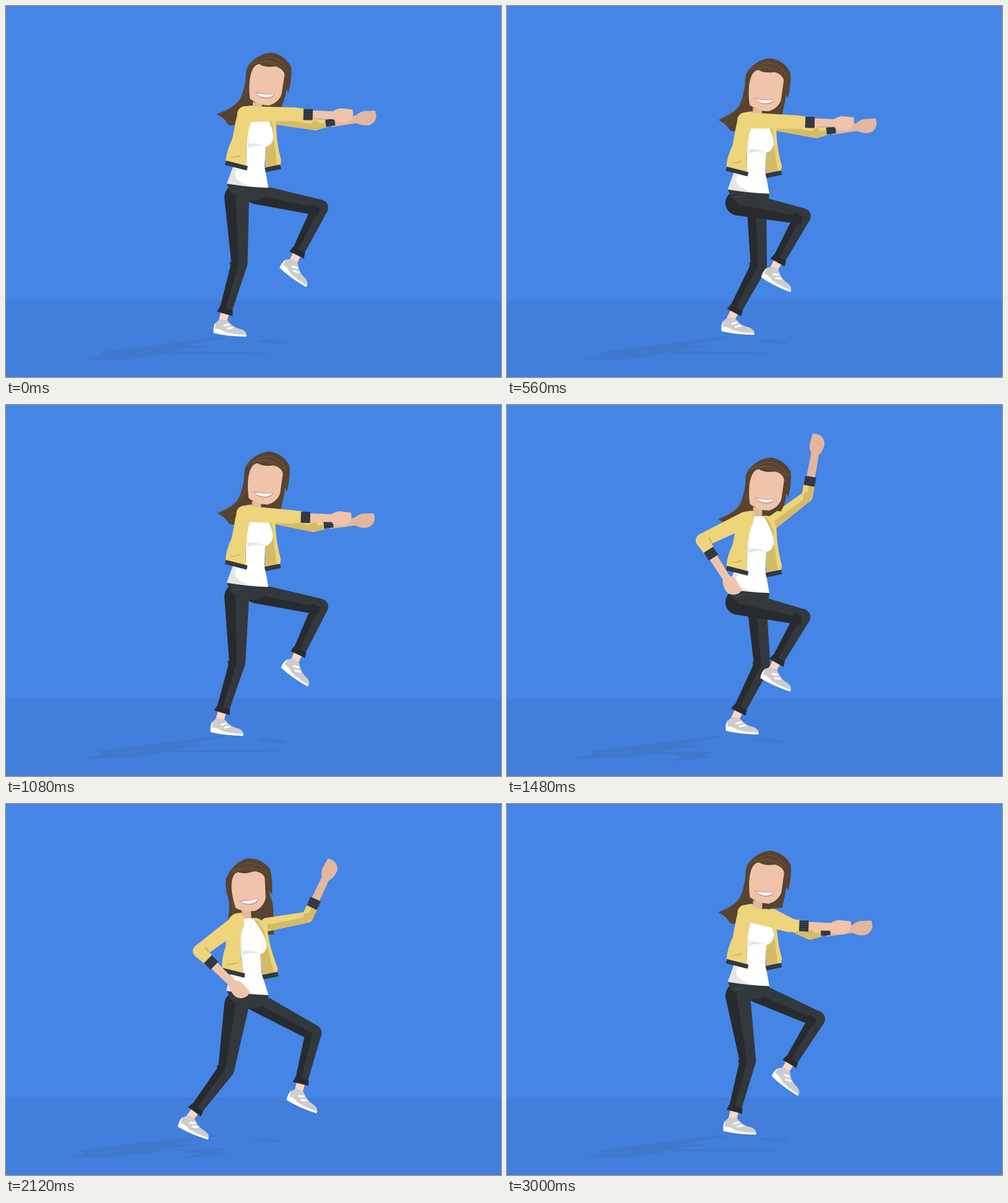
Write an HTML page with a canvas that moves like this. It is 800 by 600 pixels and loops after 3040 ms.

```html
<!DOCTYPE html>
<html>
<head>
<meta charset="utf-8">
<style>
html, body { margin: 0; width: 100%; height: 100%; overflow: hidden; background: #4585e5; }
canvas { display: block; }
</style>
</head>
<body>
<canvas id="stage" width="800" height="600"></canvas>
<script>
const ctx = document.getElementById('stage').getContext('2d');
const LOOP = 3040, STEP = 40;
const BEATS = [0, 580, 1069, 1520, 1970, 2590, LOOP];
const PANTS = '#33383c', PANTS_DARK = '#272b2f', NAVY = '#2a303b';
const YELLOW = '#eed47a', MUSTARD = '#d4bb68', HAIR = '#574330';
const SKIN = '#efc4aa', SKIN_DARK = '#e2b79e', ANKLE = '#ffd5c5';

// Periodic keys: [phase, values...], phase in 0..1
const FOOT_NEAR = [
  [0, 350, 510, 4], [.121, 297, 508, 21], [.25, 257, 500, 38], [.35, 338, 458, 40],
  [.456, 429, 428, 22], [.483, 431, 426, 25], [.555, 443, 453, 17],
  [.75, 446, 511, 3], [.956, 364, 510, 4]];
const FOOT_FAR = [
  [0, 464, 414, 34], [.121, 473, 465, 22], [.25, 465, 511, 3], [.456, 368, 508, 4],
  [.483, 361, 507, 4], [.555, 338, 505, 13], [.75, 295, 500, 35],
  [.86, 372, 458, 42], [.956, 450, 431, 35]];
const DROP = [[0, 0], [.121, 15], [.25, 27], [.36, 20], [.456, 10], [.5, 9.5],
  [.555, 15], [.75, 25], [.88, 9], [.956, .5]];
const LEAN = [[0, .03], [.11, .83], [.242, 1], [.5, .85], [.75, .35], [.91, .1], [.966, .12]];
// Arm keys: elbow x, y, hand x, y
const PUSH_NEAR = [[0, 465, 175, 545, 177], [.11, 440, 223, 518, 235], [.35, 425, 232, 495, 255],
  [.6, 422, 225, 496, 240], [.91, 455, 196, 540, 199], [.966, 467, 178, 545, 180]];
const PUSH_FAR = [[0, 500, 192, 583, 181], [.11, 472, 228, 557, 233], [.35, 462, 235, 530, 255],
  [.6, 462, 230, 530, 245], [.91, 490, 210, 575, 200], [.966, 500, 195, 582, 184]];
const HIP_NEAR = [[0, 316, 209, 363, 283], [.242, 313, 223, 377, 286], [.6, 313, 221, 376, 286],
  [.91, 316, 209, 363, 283]];
const RAISE_FAR = [[0, 484, 135, 500, 51], [.242, 487, 168, 523, 91], [.5, 488, 172, 531, 100],
  [.75, 487, 158, 520, 80], [.91, 485, 138, 501, 53]];

const mix = (a, b, k) => a + (b - a) * k;
const between = (a, b, k) => a.map((v, i) => mix(v, b[i], k));
const ramp = (t, a, b) => {
  const k = Math.min(1, Math.max(0, (t - a) / (b - a)));
  return k * k * (3 - 2 * k);
};

// Smooth periodic interpolation without overshoot
function sample(keys, p) {
  const n = keys.length;
  const at = j => {
    const turn = Math.floor(j / n), k = keys[j - turn * n];
    return [k[0] + turn, ...k.slice(1)];
  };
  let i = n - 1;
  while (keys[i][0] > p) i--;
  const [a, b, c, d] = [at(i - 1), at(i), at(i + 1), at(i + 2)];
  const h = c[0] - b[0], u = (p - b[0]) / h;
  const slope = (x, y, z, v) => {
    const s = (y[v] - x[v]) / (y[0] - x[0]), r = (z[v] - y[v]) / (z[0] - y[0]);
    if (s * r <= 0) return 0;
    return Math.sign(s) * Math.min(Math.abs(s + r) / 2, 3 * Math.abs(s), 3 * Math.abs(r));
  };
  return b.slice(1).map((y, k) => {
    const v = k + 1, u2 = u * u, u3 = u2 * u;
    return y * (2 * u3 - 3 * u2 + 1) + c[v] * (3 * u2 - 2 * u3)
      + h * (slope(a, b, c, v) * (u3 - 2 * u2 + u) + slope(b, c, d, v) * (u3 - u2));
  });
}

function fill(d, color) {
  ctx.fillStyle = color;
  ctx.fill(new Path2D(d));
}
function stroke(d, color, width) {
  ctx.strokeStyle = color;
  ctx.lineWidth = width;
  ctx.stroke(new Path2D(d));
}
function poly(points, color) {
  fill('M' + points.map(p => p.join()).join('L') + 'Z', color);
}
function dot([x, y], r, color) {
  ctx.fillStyle = color;
  ctx.beginPath();
  ctx.arc(x, y, r, 0, 7);
  ctx.fill();
}
// Closed soft curve through the midpoints; a repeated point makes a corner
function blob(points, color) {
  const n = points.length, mid = i => between(points[i % n], points[(i + 1) % n], .5);
  let d = 'M' + mid(n - 1);
  points.forEach((p, i) => d += 'Q' + p + ' ' + mid(i));
  fill(d + 'Z', color);
}
function side(a, b) {
  const dx = b[0] - a[0], dy = b[1] - a[1], l = Math.hypot(dx, dy) || 1;
  return [-dy / l, dx / l];
}
function taper(a, b, ra, rb, color, lo = -1, hi = 1) {
  const n = side(a, b), off = (p, r) => [p[0] + n[0] * r, p[1] + n[1] * r];
  poly([off(a, ra * lo), off(b, rb * lo), off(b, rb * hi), off(a, ra * hi)], color);
}
function rib(a, b, width) {
  const d = `M${a}L${b}`;
  stroke(d, NAVY, width);
  ctx.setLineDash([.8, 2.4]);
  stroke(d, '#505763', width - 2);
  ctx.setLineDash([]);
}
function placed(x, y, angle, draw) {
  ctx.save();
  ctx.translate(x, y);
  ctx.rotate(angle);
  draw();
  ctx.restore();
}

function shoe() {
  fill('M-12 4L-5-3L7-3C13 4 19 8 27 10Q40 12 40 20L-12 18Z', '#cdcdcd');
  fill('M-12 3Q-15 12-13 20Q10 24 40 22L40 19Q20 20 5 17Q-5 11-11 13Z', '#fff');
  stroke('M2 7L12 4M8 11.5L18 8.5', '#fff', 3);
}

function leg(hip, [x, y, degrees], hipR) {
  const thigh = 107, shin = 98, dx = x - hip[0], dy = y - hip[1];
  const d = Math.min(Math.hypot(dx, dy), thigh + shin - .1);
  const bend = Math.acos((thigh ** 2 + d * d - shin ** 2) / (2 * thigh * d));
  const a = Math.atan2(dy, dx) - bend;
  const knee = [hip[0] + thigh * Math.cos(a), hip[1] + thigh * Math.sin(a)];
  const ankle = [x, y], on = k => between(knee, ankle, k);

  taper(on(.78), ankle, 7, 6.5, ANKLE);
  placed(x, y, degrees * Math.PI / 180, shoe);
  dot(hip, hipR, PANTS_DARK);
  dot(knee, 13, PANTS);
  taper(hip, knee, hipR, 13, PANTS);
  taper(knee, on(.83), 13, 10, PANTS);
  taper(hip, knee, hipR, 13, PANTS_DARK, .1, 1);
  taper(knee, on(.83), 13, 10, PANTS_DARK, .1, 1);
  taper(on(.02), on(.1), 16, 12, PANTS_DARK, .5, 1);
  taper(on(.78), on(.87), 11, 13, PANTS_DARK);
}

function polar(shoulder, [ex, ey, hx, hy]) {
  const ux = ex - shoulder[0], uy = ey - shoulder[1], fx = hx - ex, fy = hy - ey;
  return [Math.atan2(uy, ux), Math.hypot(ux, uy), Math.atan2(fy, fx), Math.hypot(fx, fy)];
}

function arm(shoulder, poseA, poseB, k, far) {
  const [a, upper, b, fore] = between(polar(shoulder, poseA), polar(shoulder, poseB), k);
  const elbow = [shoulder[0] + upper * Math.cos(a), shoulder[1] + upper * Math.sin(a)];
  const hand = [elbow[0] + fore * Math.cos(b), elbow[1] + fore * Math.sin(b)];
  const on = v => between(elbow, hand, v), r = far ? 9 : 11, skin = far ? SKIN_DARK : SKIN;
  const cuffR = far ? mix(5.5, 9, k) : 9;

  taper(on(.3), hand, 7, 6, skin);
  placed(...hand, b, () =>
    fill('M-17-6Q-8-13 2-11L15-10L16-3Q14 10 2 12Q-10 12-17 6Z', skin));
  dot(shoulder, r + 2, YELLOW);
  dot(elbow, r, YELLOW);
  taper(shoulder, elbow, r + 2, r, YELLOW);
  taper(elbow, on(.26), r, cuffR, YELLOW);
  if (far) {
    taper(shoulder, elbow, r + 2, r, MUSTARD, 0, 1);
    taper(elbow, on(.26), r, cuffR, MUSTARD, -.1, 1);
    dot(elbow, r - 2, MUSTARD);
  } else if (k > .5) {
    const n = side(shoulder, elbow);
    const p = between(shoulder, elbow, .85);
    stroke(`M${p}L${p[0] - n[0] * 10},${p[1] - n[1] * 10}`, MUSTARD, 3);
  }
  const cuff = on(.29), n = side(elbow, hand);
  rib([cuff[0] - n[0] * cuffR, cuff[1] - n[1] * cuffR],
    [cuff[0] + n[0] * cuffR, cuff[1] + n[1] * cuffR], 15);
}

function backHair(lean) {
  const swung = [[392, 92], [388, 128], [376, 160], [340, 175], [340, 175], [354, 183],
    [360, 196], [378, 188], [398, 168], [446, 164], [446, 164], [458, 118]];
  const hung = [[357, 92], [354, 122], [362, 145], [359, 170], [359, 174], [366, 186],
    [380, 190], [400, 194], [420, 196], [433, 196], [433, 196], [431, 118]];
  blob(swung.map((p, i) => between(p, hung[i], lean)), HAIR);
  const strand = i => {
    const p = between(swung[i], hung[i], lean);
    return [p[0] + 7, p[1] - 2];
  };
  stroke(`M${strand(1)}Q${strand(2)} ${strand(4)}`, '#76583b', 1);
}

function torso() {
  fill('M396 170L423 170Q434 200 433 214Q430 226 420 228L418 258L424 294Q390 293 357 287L368 258L388 262L390 205Z', '#fff');
  fill('M357 287L367 261L374 264Q362 280 394 291Q374 290 357 287Z', '#e5e5e5');
  fill('M396 182L399 182Q390 215 391 223Q405 220 419 227Q400 224 391 230L388 260Z', '#e5e5e5');
  fill('M416 169Q434 168 437 190Q437 220 445 250L443 260L419 263L420 228Q431 225 433 213Q432 195 416 169Z', YELLOW);
  fill('M416 169Q427 175 432 195Q434 230 439 261L419 263L420 228Q431 225 433 213Q432 195 416 169Z', MUSTARD);
  fill('M399 161Q377 160 372 185L366 215Q356 235 355 253L389 262Q386 220 397 182L402 170Z', YELLOW);
  stroke('M363 244Q374 245 380 241', '#c6a453', 1);
  rib([355, 253.5], [390, 262.5], 7);
  rib([419, 265], [444, 260], 7);
}

function head() {
  fill('M389 130Q386 101 396 92Q412 76 430 75.5Q452 79 462 99Q464 115 457 141L454 134Q453 150 445 163L400 155Z', HAIR);
  stroke('M394 97Q410 83 430 83Q449 87 457 108M402 94Q430 80 452 104M412 91Q438 88 455 116', '#75583c', 1);
  fill('M395 118Q399 94 411 94Q419 100 436 98Q451 102 451 113L446 143Q441 157 425 161Q407 160 395 150Q393 134 395 118Z', SKIN);
  fill('M403 139Q418 143 435 142Q433 150 422 150Q408 149 403 139Z', '#d3968b');
  fill('M405 141Q418 144 434 143Q430 148 421 148Q410 147 405 141Z', '#fff');
}

function shadow(lean, up) {
  const color = '#3f78ce', x = -32 * lean - 18 * up * (1 - lean);
  poly([[132 + x, 569], [158 + x, 567], [152 + x, 560], [230 + x, 550], [300 + x / 2, 541],
    [345 + x / 3, 535], [358 + x / 3, 537], [295 + x / 2, 548], [326 + x / 2, 552],
    [275 + x / 2, 557], [250 + x / 2, 564], [205 + x, 571], [140 + x, 572]], color);
  poly([[407, 541], [432, 539], [456, 544], [450, 547], [415, 545]].map(p => [p[0] + x / 3, p[1]]), color);
  if (up < .5) poly([[270 + x / 2, 558], [495, 560], [270 + x / 2, 562]], color);
  else poly([[235, 562], [328, 561], [318, 567], [335, 570], [300, 573], [258, 577], [285, 569]]
    .map(p => [p[0] + 28 * lean, p[1] - 4 * lean]), color);
}

function draw(t) {
  let i = 5;
  while (BEATS[i] > t) i--;
  const beat = (t - BEATS[i]) / (BEATS[i + 1] - BEATS[i]);
  const cycle = (i + beat) / 2 % 1;
  const [drop] = sample(DROP, cycle), [lean] = sample(LEAN, beat);
  const up = ramp(t, 1140, 1440) - ramp(t, 2200, 2560);
  const skew = .14 * lean;

  ctx.fillStyle = '#4585e5';
  ctx.fillRect(0, 0, 800, 600);
  ctx.fillStyle = '#427edb';
  ctx.fillRect(0, 475, 800, 125);
  shadow(lean, up);

  ctx.save();
  ctx.translate(0, drop);
  backHair(lean);
  arm([430 - 8 * lean, 180], sample(PUSH_FAR, beat), sample(RAISE_FAR, beat), up, true);
  ctx.restore();

  leg([403, 304 + drop], sample(FOOT_FAR, cycle), 16);
  leg([373, 309 + drop], sample(FOOT_NEAR, cycle), 20);

  ctx.save();
  ctx.translate(0, drop);
  fill('M357 287L424 293L423 303Q410 318 392 314L374 309L362 300Z', PANTS);
  stroke('M366 299Q378 300 385 295', '#4b5258', 1);
  ctx.save();
  ctx.transform(1, 0, skew, 1, -skew * 293, 0);
  fill('M400 148L415 148L414 171L407 175L399 171Z', SKIN_DARK);
  torso();
  ctx.restore();
  placed(410 - 22 * lean, 160, -.21 * lean, () => {
    ctx.translate(-410, -160);
    head();
  });
  arm([387 - 15 * lean, 175 + 4 * lean], sample(PUSH_NEAR, beat), sample(HIP_NEAR, beat), up, false);
  ctx.restore();
}

const start = performance.now();
function tick() {
  const t = (performance.now() - start) % LOOP;
  draw(Math.floor(t / STEP) * STEP);
  requestAnimationFrame(tick);
}
tick();
</script>
</body>
</html>
```
